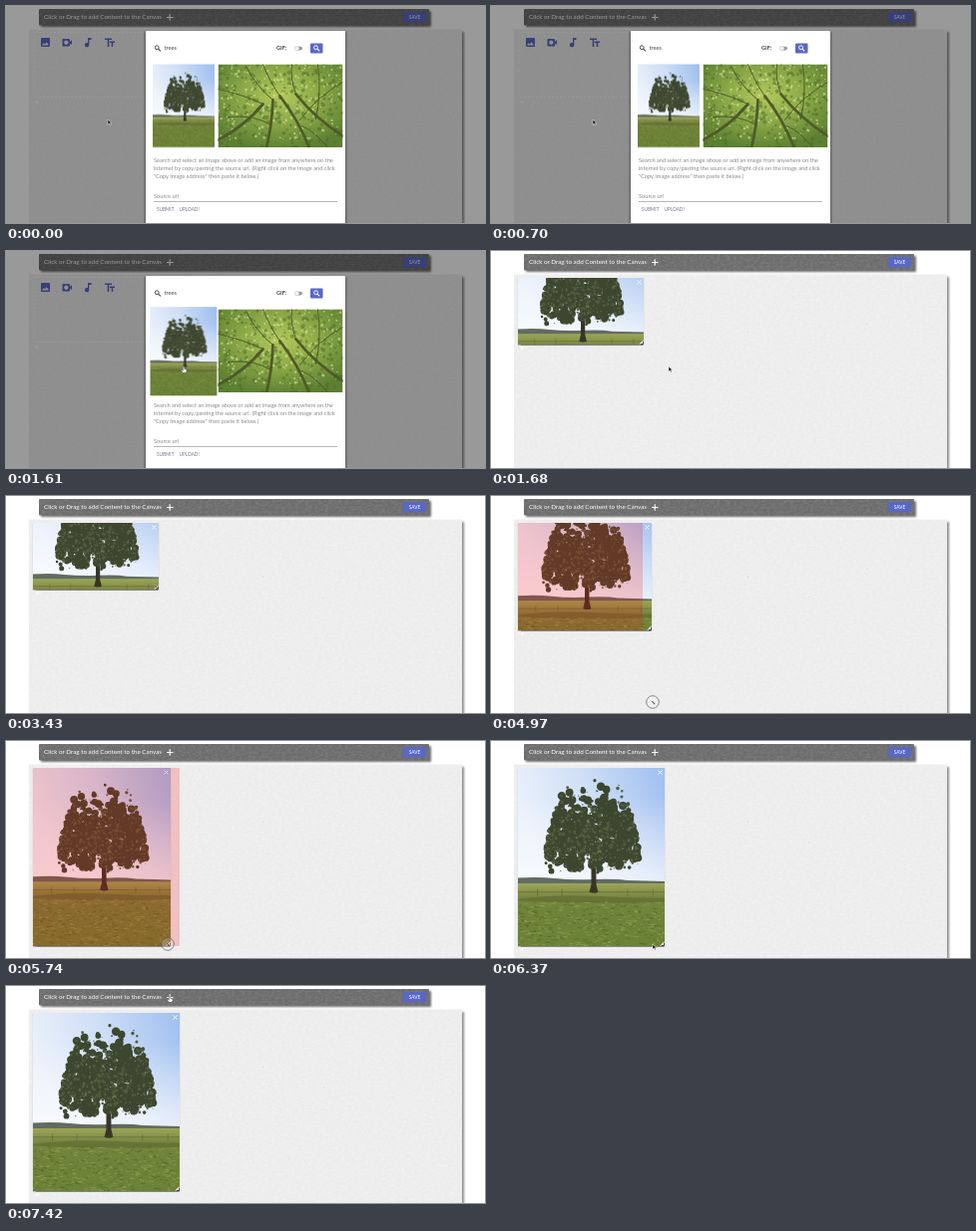
These frames come from a looping animation (480 by 218 pixels, 7.49 s). An HTML page:

```html
<!DOCTYPE html>
<html lang="en">
<head>
<meta charset="utf-8">
<title>Add an image to the canvas</title>
<style>
  :root { --loop: 7490ms; --indigo: #5968c6; }
  html, body { margin: 0; width: 100%; height: 100%; overflow: hidden; background: #fff; }
  svg { display: block; overflow: visible; }
  .layer { position: absolute; left: 0; top: 0; }
  text { font-family: Lato, "Open Sans", sans-serif; }
  .indigo { fill: var(--indigo); }
  .body { font-size: 5.65px; fill: #8a8a8a; }
  .action { font-size: 4.7px; fill: #777790; }

  .item, .ghost { position: absolute; left: 27px; top: 27px; }
  .item { animation: resize var(--loop) linear infinite, placed var(--loop) step-end infinite; box-shadow: 0 .5px 1px rgba(0, 0, 0, .45); }
  .photo { position: absolute; width: 100%; height: 100%; overflow: hidden; }
  .close { position: absolute; right: 2.5px; top: 1.5px; }
  .handle { position: absolute; right: 0; bottom: 0; }
  .mark { position: absolute; left: 2px; bottom: -6px; }
  .ghost { background: rgba(255, 0, 0, .19); animation: snap var(--loop) linear infinite, dragging var(--loop) step-end infinite; }

  .picker { animation: picking var(--loop) step-end infinite; }
  .thumb { transform-origin: 178.25px 100.25px; animation: hover var(--loop) ease-out infinite; }

  .cursor { animation: travel var(--loop) ease-in-out infinite; }
  .arrow { animation: arrow var(--loop) step-end infinite; }
  .hand { animation: hand var(--loop) step-end infinite; }
  .grip { animation: grip var(--loop) step-end infinite; }
  .ring { animation: dragging var(--loop) step-end infinite; }

  @keyframes picking { 0% { visibility: visible } 22.42%, 100% { visibility: hidden } }
  @keyframes placed { 0% { visibility: hidden } 22.42%, 100% { visibility: visible } }
  @keyframes dragging { 0% { visibility: hidden } 53.2% { visibility: visible } 79.44%, 100% { visibility: hidden } }
  @keyframes hover { 0%, 19.63% { transform: scale(1) } 21.4%, 100% { transform: scale(1.08) } }
  @keyframes arrow {
    0% { visibility: visible } 19.63% { visibility: hidden } 22.42% { visibility: visible }
    41% { visibility: hidden } 79.44% { visibility: visible } 98.5%, 100% { visibility: hidden }
  }
  @keyframes hand {
    0% { visibility: hidden } 19.63% { visibility: visible }
    22.42% { visibility: hidden } 98.5%, 100% { visibility: visible }
  }
  @keyframes grip { 0% { visibility: hidden } 41% { visibility: visible } 79.44%, 100% { visibility: hidden } }
  @keyframes resize {
    0%, 53.2% { width: 126px; height: 67px }
    55.14% { width: 126px; height: 70px }
    60.75% { width: 130px; height: 86px }
    66.36% { width: 134px; height: 108px }
    71.03% { width: 137px; height: 179px }
    76.64%, 79.44% { width: 138px; height: 179px }
    82.78%, 100% { width: 147px; height: 179px }
  }
  @keyframes snap {
    0%, 53.2% { width: 125px; height: 67px }
    55.14% { width: 125px; height: 70px }
    60.75% { width: 125px; height: 86px }
    66.36% { width: 125px; height: 108px }
    69% { width: 125px; height: 148px }
    71.03%, 100% { width: 147px; height: 179px }
  }
  @keyframes travel {
    0%, 15.89% { transform: translate(102px, 114px) }
    20.56%, 23.36% { transform: translate(178px, 116px) }
    27.1% { transform: translate(175px, 121px) }
    37.38% { transform: translate(152px, 93px) }
    42.06%, 53.2% { transform: translate(150px, 91px); animation-timing-function: linear }
    55.14% { transform: translate(151px, 119px); animation-timing-function: linear }
    60.75% { transform: translate(157px, 179px); animation-timing-function: ease-out }
    64.49%, 66.36% { transform: translate(162px, 207px) }
    76.64%, 85.45% { transform: translate(162px, 204px) }
    97.46%, 100% { transform: translate(164px, 10px) }
  }
</style>
</head>
<body>

<svg class="layer" width="480" height="218">
  <defs>
    <filter id="grain" x="0" y="0" width="1" height="1">
      <feTurbulence type="fractalNoise" baseFrequency=".3 .45" numOctaves="3" seed="4"/>
      <feColorMatrix values="0 0 0 0 1  0 0 0 0 1  0 0 0 0 1  1.6 0 0 0 -.55"/>
    </filter>
    <filter id="soft" x="-5%" y="-20%" width="110%" height="150%"><feGaussianBlur stdDeviation="1.1"/></filter>
    <linearGradient id="sky" x1="0" y1=".3" x2="1" y2="0">
      <stop offset="0" stop-color="#e9f0fb"/><stop offset=".45" stop-color="#cfdff6"/><stop offset="1" stop-color="#9dbdf0"/>
    </linearGradient>
    <linearGradient id="haze" x2="0" y2="1">
      <stop offset=".3" stop-color="#fff" stop-opacity="0"/><stop offset="1" stop-color="#fff" stop-opacity=".7"/>
    </linearGradient>
    <linearGradient id="field" x2="0" y2="1">
      <stop offset="0" stop-color="#9ca658"/><stop offset=".2" stop-color="#77853f"/>
      <stop offset=".4" stop-color="#6f8339"/><stop offset="1" stop-color="#6a8236"/>
    </linearGradient>
    <radialGradient id="canopy" cx=".5" cy=".38" r=".65">
      <stop offset="0" stop-color="#b3c95c"/><stop offset=".5" stop-color="#8aa846"/><stop offset="1" stop-color="#5c7f32"/>
    </radialGradient>
    <symbol id="tree" viewBox="0 0 150 200" preserveAspectRatio="xMidYMid slice">
      <rect width="150" height="130" fill="url(#sky)"/>
      <rect width="150" height="130" fill="url(#haze)"/>
      <path d="M0 121.500Q20 120 38 122T78 123 112 124L150 125V130H0Z" fill="#626b60"/>
      <rect y="127" width="150" height="73" fill="url(#field)"/>
      <path d="M0 143Q40 138 75 140T150 142V146Q90 149 0 145Z" fill="#4d5a2a" opacity=".4"/>
      <path id="tufts" fill="none" stroke="#4c6026" opacity=".55"/>
      <path id="grass" fill="none" stroke="#98ab53" opacity=".55"/>
      <path d="M0 136H150M20 133V140M45 133V140M112 133V140M138 133V140" stroke="#59573d" stroke-width=".5"/>
      <path d="M75 95L75 128 73 136Q78 138 82 136L80 128V95Z" fill="#373626"/>
      <path id="crown" fill="#3d4730"/>
      <path id="leaves" fill="#525d3c"/>
      <path id="glints" fill="#717b58" opacity=".7"/>
    </symbol>
    <symbol id="lens" viewBox="0 0 8 8">
      <circle cx="3.1" cy="3.1" r="2.2" fill="none" stroke="currentColor" stroke-width="1.1"/>
      <path d="M4.8 4.8L7.3 7.3" stroke="currentColor" stroke-width="1.3"/>
    </symbol>
  </defs>

  <rect x="27" y="26" width="432" height="200" fill="#666" opacity=".75" filter="url(#soft)"/>
  <rect x="23" y="23.500" width="434" height="195" fill="#ececec"/>
  <rect x="23" y="23.500" width="434" height="195" filter="url(#grain)" opacity=".35"/>
  <path id="specks" fill="#d6d6d6"/>

  <rect x="35" y="5" width="391" height="16" fill="#333" opacity=".7" filter="url(#soft)"/>
  <rect x="33" y="3" width="391" height="16.5" rx="1" fill="#6c6c6c"/>
  <rect x="33" y="3" width="391" height="16.5" filter="url(#grain)" opacity=".14"/>
  <text x="38" y="13.3" font-size="6.27" fill="#fff">Click or Drag to add Content to the Canvas</text>
  <path d="M161 11.5H167.400M164.200 8.300V14.700" stroke="#fff" stroke-width="1.1"/>
  <rect x="398" y="6" width="23" height="10.300" rx="1" class="indigo"/>
  <text x="409.5" y="12.900" font-size="4.8" fill="#fff" text-anchor="middle">SAVE</text>
</svg>

<div class="item">
  <svg class="photo" width="100%" height="100%"><use href="#tree" width="100%" height="100%"/></svg>
  <svg class="close" width="5" height="5"><path d="M.5 .5L4.500 4.500M4.500 .5L.5 4.500" stroke="#fff"/></svg>
  <svg class="handle" width="5" height="5"><path d="M4.500 .5V4.500H.5Z" fill="#fff"/><path d="M4.500 2V4.500H2" fill="none" stroke="#222" stroke-width=".8"/></svg>
  <svg class="mark" width="5" height="5"><path d="M.5 2.500H4.500M2.500 .5V4.500" stroke="#fff" opacity=".8"/></svg>
</div>
<div class="ghost"></div>

<svg class="layer picker" width="480" height="218">
  <rect x="28" y="26.500" width="125" height="65" fill="none" stroke="#fff" stroke-width=".8" stroke-dasharray="2 2"/>
  <path d="M29 96.500H33M31 94.500V98.500" stroke="#fff"/>
  <g class="indigo">
    <path fill-rule="evenodd" d="M36 32H43Q44 32 44 33V40Q44 41 43 41H36Q35 41 35 40V33Q35 32 36 32ZM36 39.500H43L40.700 36.200 39 38.400 37.800 37Z"/>
    <path fill-rule="evenodd" d="M57 33H63Q64 33 64 34V36L66 34V39L64 37.500V39.500Q64 40.500 63 40.500H57Q56.500 40.500 56.500 39.500V34Q56.500 33 57 33ZM60.300 34.500A2.200 2.200 0 1 0 60.400 34.500Z"/>
    <path d="M82 32H85.500V34H83.300V39A2.200 2.200 0 1 1 82 37Z"/>
    <path d="M99 32.500H106V34H103.300V41H101.700V34H99ZM104 35.500H109V37H107.200V41H105.700V37H104Z"/>
  </g>
  <rect width="480" height="218" fill="#000" opacity=".4"/>

  <rect x="139" y="26" width="202" height="200" fill="#000" opacity=".4" filter="url(#soft)"/>
  <rect x="140" y="25" width="200" height="200" rx="1" fill="#fff"/>
  <use href="#lens" x="148.500" y="39" width="7" height="7" color="#444"/>
  <text x="158.500" y="44" font-size="5.65" fill="#444">trees</text>
  <text x="271" y="44" font-size="5.6" font-weight="bold" fill="#444">GIF:</text>
  <rect x="290" y="40.800" width="7" height="3.600" rx="1.800" fill="#999"/>
  <circle cx="291.500" cy="42.600" r="2.200" fill="#f4f4f4" stroke="#bbb" stroke-width=".5"/>
  <rect x="305" y="37.500" width="12.500" height="10" rx="1" class="indigo"/>
  <use href="#lens" x="307.800" y="39" width="7" height="7" color="#fff"/>

  <svg x="212.500" y="58.500" width="125" height="83.500" viewBox="0 0 125 83.500" style="overflow:hidden">
    <rect width="125" height="83.500" fill="url(#canopy)"/>
    <path id="shade" fill="#4c6b28" opacity=".5"/>
    <path id="sun" fill="#dce8a6" opacity=".6"/>
    <g fill="none" stroke="#4f5a28" stroke-linecap="round">
      <path stroke-width="2.800" d="M92 86Q82 58 62 32M125 72Q98 55 78 30M48 86Q54 62 55 36M0 76Q27 62 45 40"/>
      <path stroke-width="1" d="M62 32Q52 18 45 0M78 30Q72 14 74 0M55 36Q38 22 28 2M45 40Q24 30 0 25M82 56Q100 32 125 18M98 55Q104 28 100 0M54 62Q38 50 10 53M110 84Q98 68 84 62"/>
    </g>
  </svg>
  <g class="thumb">
    <svg x="147" y="58.500" width="62.500" height="83.500" style="overflow:hidden"><use href="#tree" width="62.500" height="83.500"/></svg>
  </g>

  <g class="body">
    <text x="148" y="157.300">Search and select an image above or add an image from anywhere on the</text>
    <text x="148" y="165.200">internet by copy/pasting the source url. (Right click on the image and click</text>
    <text x="148" y="173.100">"Copy Image address" then paste it below.)</text>
    <text x="148" y="193.300">Source url</text>
  </g>
  <path d="M148 196.500H332" stroke="#999" stroke-width=".7"/>
  <text class="action" x="151" y="206.300">SUBMIT</text>
  <text class="action" x="173.500" y="206.300">UPLOAD!</text>
</svg>

<svg class="layer" width="480" height="218">
  <g class="cursor">
    <circle class="ring" r="6.300" fill="#fff" fill-opacity=".2" stroke="#555" stroke-width=".7"/>
    <path class="arrow" d="M0 0V5.200L1.300 4.100 2.200 6 3.100 5.600 2.300 3.700H3.900Z" fill="#111" stroke="#fff" stroke-width=".5"/>
    <path class="hand" d="M-.7 .2Q0 -.6 .7 .2V2.300L3 3V5L2.200 6.300H-1L-2.600 3.800 -1.800 3.300 -.7 4.300Z" fill="#fff" stroke="#444" stroke-width=".5"/>
    <path class="grip" d="M-1 -1H.6L.1 -.5 1.700 1.100 2.200 .6V2.200H.6L1.100 1.700 -.5 .1 -1 .6Z" fill="#111" stroke="#fff" stroke-width=".3"/>
  </g>
</svg>

<script>
  let seed = 11;
  const rand = (low, high) => {
    seed = (seed * 16807) % 2147483647;
    return low + (high - low) * seed / 2147483647;
  };
  const dot = (x, y, r) => `M${x - r} ${y}a${r} ${r} 0 1 0 ${2 * r} 0a${r} ${r} 0 1 0 ${-2 * r} 0`;
  const fill = (id, count, part) =>
    document.getElementById(id).setAttribute('d', Array.from({ length: count }, part).join(''));

  // Crown outline: a blunt top that widens steadily and tucks in at the bottom.
  const halfWidth = t => 56 * (.25 + .75 * t ** .4) * (1 - .25 * t ** 10);
  const foliage = (low, high) => () => {
    const t = Math.sqrt(rand(0, 1)) * .6 + rand(0, .4);
    const r = rand(low, high);
    const reach = halfWidth(t) - r;
    return dot(76 + rand(-reach, reach), 19 + 98 * t, r);
  };
  const scatter = (x, y, w, h, low, high) => () => dot(rand(x, x + w), rand(y, y + h), rand(low, high));
  const blade = () => `M${rand(-2, 148)} ${rand(146, 199)}l${rand(1, 5)} ${rand(-1, 1)}`;

  fill('crown', 620, foliage(1.5, 4.5));
  fill('leaves', 240, foliage(.6, 1.8));
  fill('glints', 130, foliage(.4, 1));
  fill('tufts', 260, blade);
  fill('grass', 260, blade);
  fill('shade', 260, scatter(0, 0, 125, 84, .5, 2.2));
  fill('sun', 260, scatter(0, 0, 125, 76, .3, 1.4));
  fill('specks', 40, scatter(25, 26, 430, 190, .3, .6));
</script>
</body>
</html>
```
